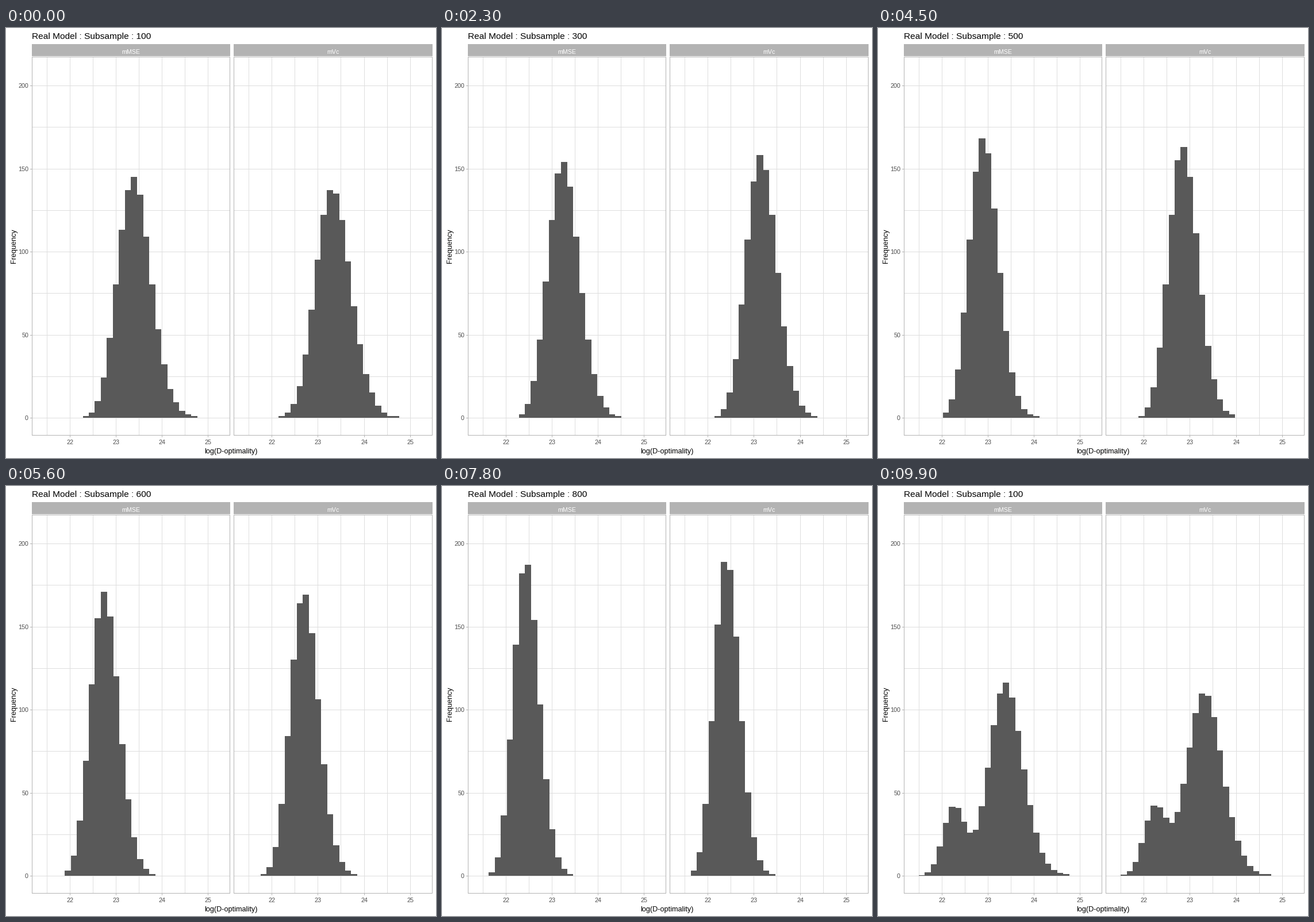
Recreate the animation shown at these times as a matplotlib script. Size 748x748 px, loop 10000 ms.

```python
import numpy as np
import matplotlib.pyplot as plt
from matplotlib.animation import FuncAnimation

SIZE, BINS, BIN_W = 748, 30, 10.43
Y0, PER_COUNT = 677.9, 2.888
FLOOR = round(Y0)
GREY, GRID, BAR, LABEL = "#b3b3b3", "#dedede", "#595959", "#4d4d4d"
PANEL_STEP = 351.25

# Bell centre and spread, in bins, at a few subsample sizes
KEYS = [100, 300, 500, 700, 900]
BELLS = {
    "mMSE": ([15.17, 14.05, 11.41, 9.05, 6.58], [2.77, 2.60, 2.38, 2.31, 1.90]),
    "mVc": ([14.69, 13.40, 11.05, 8.75, 6.46], [2.90, 2.54, 2.45, 2.24, 1.93]),
}
SKEW, DRAWS = 0.2, 1000
SIZES = list(range(100, 1000, 100))

# (first moving step, number of steps) for each change of state
MOVES = [(6, 6), (18, 6)] + [(30 + 11 * i, 5) for i in range(7)]


def histogram(size, centres, spreads):
    """Counts of a slightly right-skewed bell."""
    mean, sd = np.interp(size, KEYS, centres), np.interp(size, KEYS, spreads)
    z = (np.arange(BINS) - mean) / sd
    bell = np.exp(-z**2 / 2) / (sd * np.sqrt(2 * np.pi))
    return np.round(np.clip(DRAWS * bell * (1 + SKEW / 6 * (z**3 - 3 * z)), 0, None))


def pose(step):
    """Previous state, next state and progress between them."""
    a, b, t = 0, 0, 1.0
    for i, (start, n) in enumerate(MOVES):
        if step >= start:
            a, b = i, (i + 1) % len(SIZES)
            t = min(1.0, (step - start + 1) / n)
    return a, b, t


plt.rcParams["font.family"] = "Liberation Sans"
fig = plt.figure(figsize=(SIZE / 72, SIZE / 72), dpi=72, facecolor="white")
ax = fig.add_axes([0, 0, 1, 1])
ax.set(xlim=(0, SIZE), ylim=(SIZE, 0))
ax.set_autoscale_on(False)
ax.axis("off")


def box(x, y, w, h, color, z=1):
    patch = plt.Rectangle((x, y), w, h, fc=color, lw=0, zorder=z)
    return ax.add_patch(patch)


def label(x, y, s, px, color="black", ha="center", **kw):
    return ax.text(x, y, s, fontsize=px, color=color, ha=ha, va="baseline", **kw)


def draw_panel(name, dx):
    left, right, top, bottom = round(44.9 + dx), round(389.4 + dx), 50, 708
    w, h = right - left + 1, bottom - top + 1
    box(left, 28, w, 21, GREY)
    label(217.3 + dx, 44.5, name, 10.6, "white")
    for k in range(9):
        box(left, round(Y0 - 25 * k * PER_COUNT), w, 1, GRID)
    for k in range(8):
        x = round(70.9 + dx + 40.08 * k)
        box(x, top, 1, h, GRID)
        if k % 2:
            box(x, bottom + 1, 1, 3, GREY)
            label(x + 0.5, 724, str(22 + k // 2), 10.8, LABEL)
    for x in (left, right):
        box(x, top, 1, h, GREY, 3)
    for y in (top, bottom):
        box(left, y, w, 1, GREY, 3)
    edges = 61.01 + dx + BIN_W * np.arange(BINS + 1)
    starts, ends = np.floor(edges[:-1]), np.ceil(edges[1:])
    return [box(x, FLOOR, end - x, 0, BAR, 2) for x, end in zip(starts, ends)]


bars = [draw_panel(name, i * PANEL_STEP) for i, name in enumerate(BELLS)]
data = [[histogram(s, *bell) for s in SIZES] for bell in BELLS.values()]

for count in range(0, 201, 50):
    y = round(Y0 - count * PER_COUNT)
    box(42, y, 3, 1, GREY)
    label(39, y + 4.3, str(count), 10.8, LABEL, "right")
title = label(45, 19, "", 15.45, ha="left")
label(391.5, 740, "log(D-optimality)", 12.65)
label(17, 379, "Frequency", 12.65, rotation=90, rotation_mode="anchor")


def update(step):
    a, b, t = pose(step)
    for patches, rows in zip(bars, data):
        counts = (1 - t) * rows[a] + t * rows[b]
        for patch, count in zip(patches, counts):
            top = np.floor(Y0 - PER_COUNT * count) if count else FLOOR
            patch.set_y(top)
            patch.set_height(FLOOR - top)
    title.set_text(f"Real Model : Subsample : {SIZES[b if t >= 0.5 else a]}")
    return [title, *bars[0], *bars[1]]


anim = FuncAnimation(fig, update, frames=100, interval=100, repeat=True)
plt.show()
```
